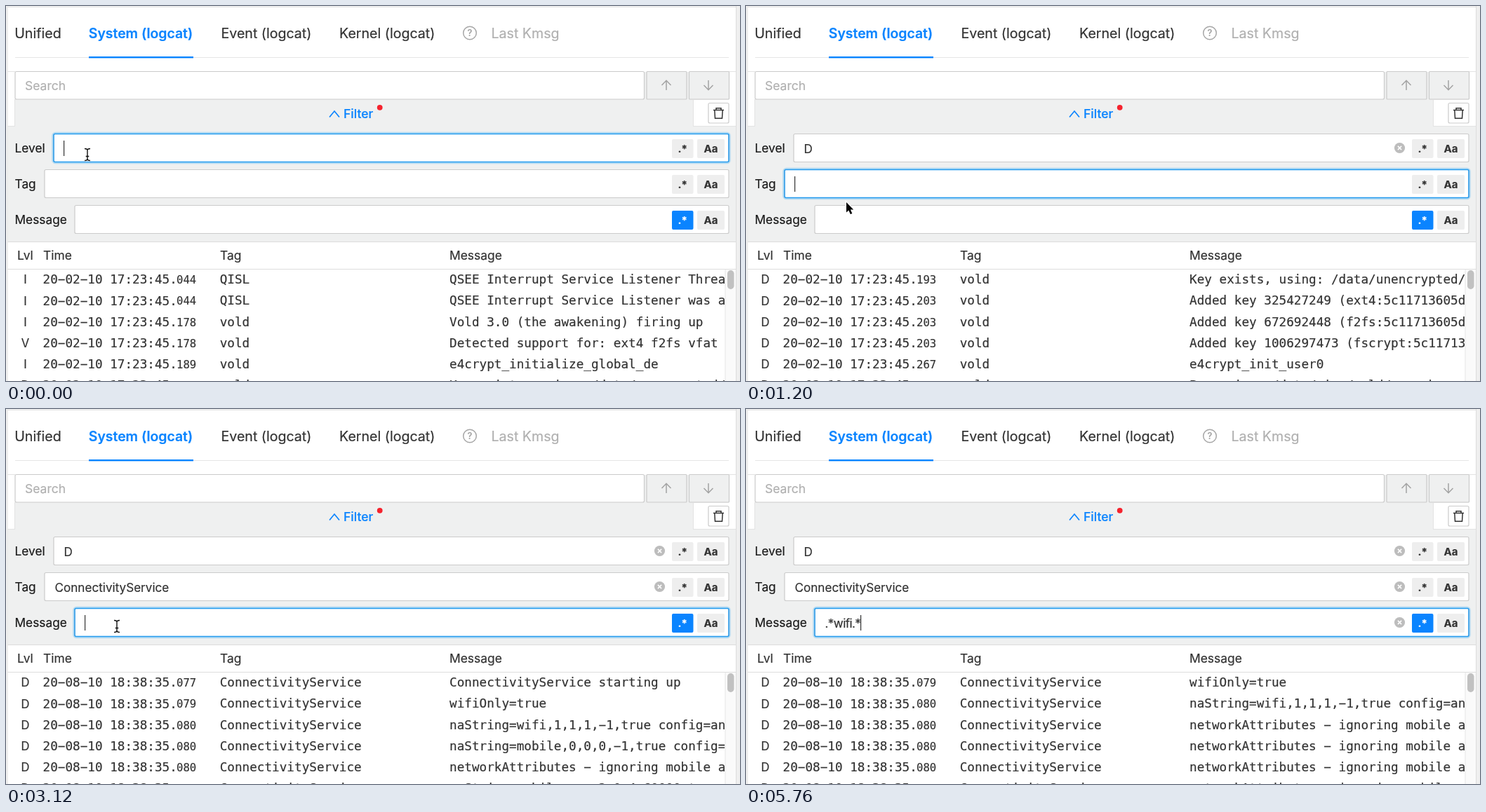
Recreate the animation shown at these times as an HTML page with a canvas. Size 1046 by 535 pixels, loop 6000 ms.

```html
<!DOCTYPE html>
<html lang="en">
<head>
<meta charset="utf-8">
<title>Log filter</title>
<style>
html, body { margin: 0; width: 100%; height: 100%; overflow: hidden; background: #fff; }
canvas { display: block; width: 100vw; height: 100vh; }
</style>
</head>
<body>
<canvas id="stage"></canvas>
<script>
const W = 1046, H = 535, LOOP = 6000, TICK = 120;
const canvas = document.getElementById('stage');
const ctx = canvas.getContext('2d');
const SANS = 'Inter, "Open Sans", sans-serif';
const MONO = '"DejaVu Sans Mono", "Liberation Mono", monospace';
const BLUE = '#0a84ff', PANEL = '#eff0f0', EDGE = '#cbcbcb', LINE = '#e3e3e3';
const INK = '#333', DARK = '#1c1c1c', FADED = '#b0b0b0';

const early = '20-02-10 17:23:45.', late = '20-08-10 18:38:35.';
const CS = 'ConnectivityService';
const ignoring = 'networkAttributes - ignoring mobile as it is';
const wifi = ['D', '080', CS, 'naString=wifi,1,1,1,-1,true config=and'];
const skip = ['D', '080', CS, ignoring];

// Each row: level, milliseconds, tag, message
const tables = {
  all: { day: early, rows: [
    ['I', '044', 'QISL', 'QSEE Interrupt Service Listener Thread'],
    ['I', '044', 'QISL', 'QSEE Interrupt Service Listener was an'],
    ['I', '178', 'vold', 'Vold 3.0 (the awakening) firing up'],
    ['V', '178', 'vold', 'Detected support for: ext4 f2fs vfat'],
    ['I', '189', 'vold', 'e4crypt_initialize_global_de'],
    ['D', '193', 'vold', 'Key exists, using: /data/unencrypted/k'],
  ] },
  debug: { day: early, rows: [
    ['D', '193', 'vold', 'Key exists, using: /data/unencrypted/k'],
    ['D', '203', 'vold', 'Added key 325427249 (ext4:5c11713605d)'],
    ['D', '203', 'vold', 'Added key 672692448 (f2fs:5c11713605d)'],
    ['D', '203', 'vold', 'Added key 1006297473 (fscrypt:5c117136'],
    ['D', '267', 'vold', 'e4crypt_init_user0'],
    ['D', '267', 'vold', 'Preparing: /data/misc/vold/user_keys'],
  ] },
  service: { day: late, rows: [
    ['D', '077', CS, CS + ' starting up'],
    ['D', '079', CS, 'wifiOnly=true'],
    wifi,
    ['D', '080', CS, 'naString=mobile,0,0,0,-1,true config=a'],
    skip,
    ['D', '080', CS, 'naString=mobile_mms,2,0,4,60000,true'],
  ] },
  wifi: { day: late, rows: [
    ['D', '079', CS, 'wifiOnly=true'], wifi, skip, skip, skip, skip,
  ] },
};

// Step timelines: [start, value]
const shownTable = [[0, 'all'], [360, 'debug'], [2520, 'service'], [4200, 'wifi']];
const levelText = [[0, ''], [240, 'D']];
const tagText = [[0, ''], [2400, CS]];
const typed = '.*wifi.*';
const messageText = [[0, ''], [3600, '.']];
for (let i = 2; i <= typed.length; i++) messageText.push([3600 + i * 120, typed.slice(0, i)]);
const caretOn = [[0, 1], [720, 0], [1080, 1], [1560, 0], [2040, 1], [2640, 0],
  [2880, 1], [3360, 0], [3600, 1], [5160, 0], [5640, 1]];
const pointer = [
  [0, ['beam', 116, 212]], [240, null], [480, ['beam', 116, 217]],
  [600, ['beam', 119, 243]], [720, ['beam', 121, 262]], [1200, ['arrow', 143, 280]],
  [1320, ['beam', 155, 296]], [1440, ['beam', 160, 301]], [1680, ['beam', 161, 298]],
  [1800, ['beam', 160, 297]], [2160, ['beam', 159, 296]], [2400, ['beam', 159, 303]],
  [2520, ['beam', 158, 308]], [2640, ['beam', 158, 310]], [3600, null],
];
const fields = [
  { label: 'Level', x: 68, y: 203, text: levelText, focus: [-300, 1020], hover: [-300, 600] },
  { label: 'Tag', x: 55, y: 254, text: tagText, focus: [1020, 2820], hover: [540, 1140] },
  { label: 'Message', x: 98, y: 305, text: messageText, focus: [2820, 9000],
    hover: [1260, 9000], regex: true, spacing: -0.6 },
];

const at = (list, t) => list.filter(([start]) => start <= t).pop()[1];
const clamp = v => Math.max(0, Math.min(1, v));
const fade = ([from, to], t) => clamp((t - from) / 150) * (1 - clamp((t - to) / 150));

function rect(x, y, w, h, color) {
  ctx.fillStyle = color;
  ctx.fillRect(x, y, w, h);
}

function round(x, y, w, h, r, fill, stroke, width = 1) {
  ctx.beginPath();
  ctx.roundRect(x, y, w, h, r);
  if (fill) { ctx.fillStyle = fill; ctx.fill(); }
  if (stroke) { ctx.strokeStyle = stroke; ctx.lineWidth = width; ctx.stroke(); }
}

function dot(x, y, r, color) {
  ctx.beginPath();
  ctx.arc(x, y, r, 0, 7);
  ctx.fillStyle = color;
  ctx.fill();
}

function path(d, color, width, x = 0, y = 0) {
  ctx.save();
  ctx.translate(x, y);
  ctx.strokeStyle = color;
  ctx.lineWidth = width;
  ctx.stroke(new Path2D(d));
  ctx.restore();
}

// cy is the middle of the capital letters; a hairline stroke gives the strokes their full weight
function text(str, x, cy, size, color, { weight = 400, font = SANS, align = 'left', spacing = 0 } = {}) {
  const y = cy + size * 0.364;
  ctx.font = `${weight} ${size}px ${font}`;
  ctx.letterSpacing = spacing + 'px';
  ctx.textAlign = align;
  ctx.fillStyle = ctx.strokeStyle = color;
  ctx.lineWidth = 0.2;
  ctx.fillText(str, x, y);
  ctx.strokeText(str, x, y);
  return ctx.measureText(str).width;
}

// The log font has wide hyphens
const mono = (str, x, cy, size = 17.66) =>
  text(str.replace(/-/g, '\u2212'), x, cy, size, INK, { font: MONO });

function drawTabs() {
  rect(0, 0, W, 1, '#f4f4f4');
  rect(2, 1, 1038, 1, LINE);
  rect(13, 73, 1017, 1, '#e6e6e6');
  rect(118, 72, 149, 2.4, BLUE);
  text('Unified', 12.2, 39, 19.7, INK);
  text('System (logcat)', 117.8, 39, 19.4, BLUE, { weight: 600 });
  text('Event (logcat)', 306.5, 39, 19.6, INK);
  text('Kernel (logcat)', 475, 39, 19.6, INK);
  text('Last Kmsg', 691.5, 39, 19.6, FADED);
  ctx.beginPath();
  ctx.arc(661, 38.5, 9.3, 0, 7);
  ctx.strokeStyle = '#a6a6a6';
  ctx.lineWidth = 1.5;
  ctx.stroke();
  text('?', 661, 38.5, 13, '#a0a0a0', { align: 'center', weight: 500 });
}

function drawSearch() {
  rect(2, 171, 1038, 165, PANEL);
  rect(13, 94, 1017, 77, PANEL);
  rect(980, 134, 60, 37, '#fff');
  rect(2, 93, 11, 1, LINE);
  rect(1030, 93, 10, 1, LINE);
  rect(2, 171, 11, 1, LINE);
  rect(12, 133, 1, 38, LINE);
  rect(979, 134, 1, 37, LINE);
  rect(979, 171, 61, 1, LINE);
  round(13, 93.5, 896.5, 39.5, 2, '#fff', EDGE, 1.2);
  text('Search', 27, 114, 17.5, FADED);
  for (const x of [913, 973.5]) round(x, 93.5, 57, 39.5, 1, PANEL, EDGE, 1.2);
  path('M0 7V-6.5M-6.5 0L0 -6.7L6.5 0', '#a3a3a3', 1.5, 941, 113);
  path('M0 -7V6.5M-6.5 0L0 6.7L6.5 0', '#a3a3a3', 1.5, 1001, 113);
  path('M-7 4.5L0 -4L7 4.5', BLUE, 1.7, 468, 154);
  text('Filter', 481, 154, 17.5, BLUE, { weight: 500 });
  dot(532.7, 144.8, 3.9, '#f5222d');
  round(1001, 138.5, 29, 28.5, 2, '#fff', EDGE, 1.2);
  path('M-7.5 -4.5H7.5M-3.5 -4.5V-7.3H3.5V-4.5M-5.7 -4.5L-5 7.2H5L5.7 -4.5', '#333', 1.5, 1015.5, 153);
}

function drawChip(label, x, cy, w, active) {
  round(x, cy - 13.5, w, 27, 2, active ? BLUE : '#eeeeee');
  text(label, x + w / 2, cy + 0.5, 15, active ? '#fff' : '#333', { weight: 700, align: 'center' });
}

function drawField(f, t) {
  const { x, y } = f, top = y - 20.5, w = 1030 - x, h = 40;
  const focus = fade(f.focus, t), hover = fade(f.hover, t);
  text(f.label, 12.5, y, 17.3, DARK);
  if (focus) round(x - 0.5, top - 0.5, w + 1, h + 1, 3, null, `rgba(40,165,245,${0.3 * focus})`, 4.5);
  round(x, top, w, h, 2, '#fff', EDGE, 1.2);
  ctx.globalAlpha = Math.max(focus, hover);
  round(x, top, w, h, 2, null, '#249bee', 1.5);
  ctx.globalAlpha = 1;
  const value = at(f.text, t), spacing = f.spacing || 0;
  const end = x + 14.5 + text(value, x + 14.5, y + 0.5, 17.1, INK, { spacing });
  if (focus > 0.3 && t >= f.focus[0] && t < f.focus[1] && at(caretOn, t))
    rect(Math.floor(end), y - 11, 1.2, 22, '#333');
  if (value) {
    dot(931.5, y - 0.5, 7.6, '#bdbdbd');
    path('M-2.6 -2.6L2.6 2.6M2.6 -2.6L-2.6 2.6', '#fff', 1.5, 931.5, y - 0.5);
  }
  drawChip('.*', 949, y + 0.5, 30.5, f.regex);
  drawChip('Aa', 985, y + 0.5, 39, false);
}

function drawTable(t) {
  rect(2, 336, 1038, 199, '#fff');
  rect(2, 336, 1038, 1, '#dcdcdc');
  rect(2, 375, 1038, 1, '#dedede');
  [['Lvl', 16], ['Time', 53], ['Tag', 305], ['Message', 632]]
    .forEach(([name, x]) => text(name, x, 356, 17.4, INK));
  const { day, rows } = tables[at(shownTable, t)];
  ctx.save();
  ctx.beginPath();
  ctx.rect(2, 376, 1022.5, 159);
  ctx.clip();
  rows.forEach(([level, ms, tag, message], i) => {
    const y = 389.7 + i * 30.2;
    text(level, 27.5, y + 0.7, 16.6, INK, { align: 'center' });
    mono(day, 52.5, y + 0.3);
    mono(ms, 243, y + 0.9, 15.6);
    mono(tag, 304.7, y);
    mono(message, 632, y);
  });
  ctx.restore();
  rect(1024.5, 376, 15.5, 159, '#fafafa');
  rect(1024.5, 376, 1, 159, '#e6e6e6');
  round(1028, 377, 9.5, 27, 4.7, '#c1c1c1');
}

function drawPointer(t) {
  const p = at(pointer, t);
  if (!p) return;
  const [kind, x, y] = p;
  if (kind === 'beam') {
    const d = 'M-4 -8.5Q0 -8.5 0 -6V6Q0 8.5 -4 8.5M4 -8.5Q0 -8.5 0 -6M0 6Q0 8.5 4 8.5M-2.3 2.5H2.3';
    path(d, 'rgba(255,255,255,.85)', 3.2, x, y);
    path(d, '#111', 1.4, x, y);
  } else {
    const d = 'M0 0V14.5L3.3 11.4L5.8 17L8.3 16L5.9 10.5H10.2Z';
    path(d, '#fff', 2.6, x, y);
    ctx.save();
    ctx.translate(x, y);
    ctx.fillStyle = '#000';
    ctx.fill(new Path2D(d));
    ctx.restore();
  }
}

function draw(t) {
  rect(0, 0, W, H, '#fff');
  drawTabs();
  drawSearch();
  fields.forEach(f => drawField(f, t));
  drawTable(t);
  rect(0, 0, 2, H, '#f0f0f0');
  rect(2, 0, 0.7, H, '#e6e6e6');
  rect(1040, 0, 6, H, '#efefef');
  rect(1040, 0, 1, H, '#dddddd');
  drawPointer(t);
}

function resize() {
  const scale = devicePixelRatio || 1;
  canvas.width = Math.round(innerWidth * scale);
  canvas.height = Math.round(innerHeight * scale);
}

function frame() {
  const t = performance.now() % LOOP;
  ctx.setTransform(canvas.width / W, 0, 0, canvas.height / H, 0, 0);
  draw(Math.floor(t / TICK) * TICK);
  requestAnimationFrame(frame);
}

addEventListener('resize', resize);
resize();
frame();
</script>
</body>
</html>
```
